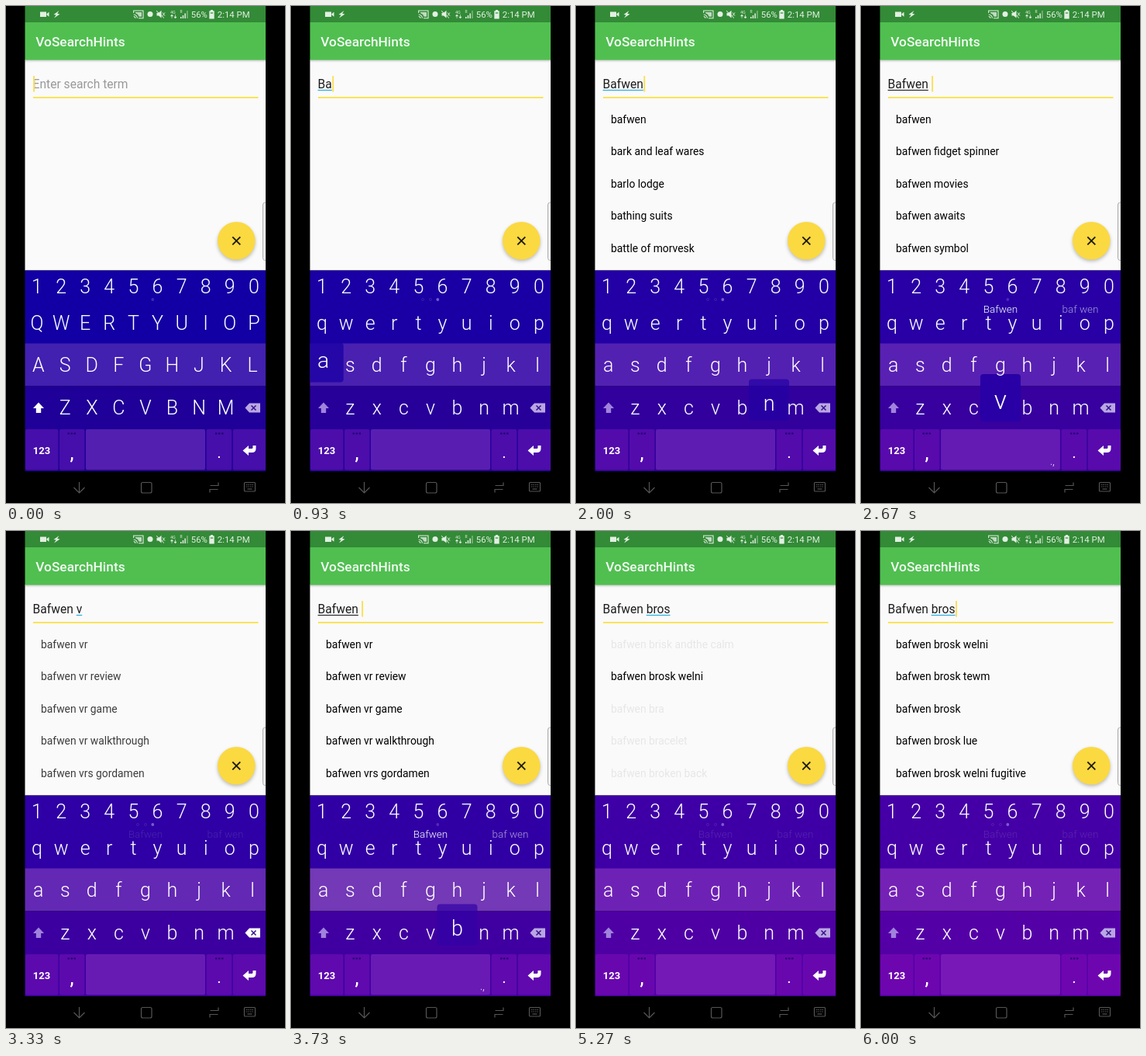
An HTML page for the animation above (6.07 s loop, 360 by 640 pixels).

```html
<!DOCTYPE html>
<html lang="en">
<head>
<meta charset="utf-8">
<title>Search suggestions</title>
<style>
html, body { margin: 0; width: 100%; height: 100%; overflow: hidden; background: #000; }
svg { display: block; width: 360px; height: 640px; font-family: Roboto, sans-serif; }
text { white-space: pre; }
.key { font-size: 25px; font-weight: 300; fill: #fff; text-anchor: middle; }
.item { font-size: 13.87px; fill: #000; }
.field { font-size: 15.6px; }
.status { font-size: 11.4px; fill: #e2efe2; }
.word { font-size: 13.5px; font-weight: 300; fill: #fff; text-anchor: middle; }
.nav { fill: none; stroke: #555; stroke-width: 1.2; }
</style>
</head>
<body>
<svg viewBox="0 0 360 640" xmlns="http://www.w3.org/2000/svg">
  <defs>
    <clipPath id="page"><rect x="24.5" y="69" width="310.5" height="271.5"/></clipPath>
    <clipPath id="board"><rect x="24.5" y="340.5" width="310.5" height="258.5"/></clipPath>
    <filter id="soft" x="-30%" y="-30%" width="160%" height="160%"><feGaussianBlur stdDeviation="2.4"/></filter>
    <linearGradient id="shade" x2="0" y2="1"><stop stop-opacity=".2"/><stop offset="1" stop-opacity="0"/></linearGradient>
  </defs>
  <rect width="360" height="640"/>
  <rect x="24.5" y="69" width="310.5" height="271.5" fill="#fafafa"/>
  <rect x="24.5" y="69" width="310.5" height="4" fill="url(#shade)"/>
  <rect x="24.5" y="21" width="310.5" height="48.5" fill="#50bf50"/>
  <rect x="24.5" width="310.5" height="21" fill="#338a37"/>
  <text x="38.3" y="52" font-size="17.3" font-weight="500" fill="#f4fbf4">VoSearchHints</text>

  <g fill="#e2efe2">
    <path d="M44 7.5h8v6.500h-8zM52.500 10l3-2.300v6l-3-2.300z"/>
    <path d="M68.500 6l-7 5 3.200.6-2.700 4 7.500-5.200-3.300-.6z"/>
    <path d="M164.700 9V6h12.300v9.700h-6M164.700 11a4.700 4.700 0 0 1 4.700 4.700M164.700 13.500a2.200 2.200 0 0 1 2.200 2.200" fill="none" stroke="#e2efe2" stroke-width="1.100"/>
    <path d="M167 8h8v5.800h-3.500a6.500 6.500 0 0 0-4.500-4.500z" opacity=".8"/>
    <circle cx="186" cy="10.500" r="3.500"/>
    <path d="M194.500 8.800h2.500l3.500-3v9.800l-3.500-3h-2.500z"/>
    <path d="M194 6l10 9.500M202 8.500l3 4M205 8.500l-3 4" stroke="#e2efe2" fill="none"/>
    <text x="212" y="9.500" font-size="5.500">4G</text>
    <path d="M212.500 13h3l-1.500-2zM214 13v3M217 14h3l-1.500 2zM218.500 11v3" stroke="#e2efe2" stroke-width=".6"/>
    <text x="224.500" y="9" font-size="5">R</text>
    <path d="M225 14h1.500v2H225zM227.700 12h1.500v4h-1.500zM230.400 9.500h1.500V16h-1.500z"/>
    <path d="M233.200 6h1.500v10h-1.500z" opacity=".45"/>
    <path d="M264 5h3v1.300h1.700V16.500h-6.400V6.300h1.700z"/>
    <path d="M263.800 9h3.400" stroke="#338a37" stroke-width="1.200"/>
  </g>
  <text class="status" x="238.800" y="14.700">56%</text>
  <text class="status" x="272.800" y="14.700">2:14 PM</text>

  <rect x="35" y="117" width="290.500" height="1.700" fill="#fbe03c"/>
  <text id="hint" class="field" x="34.600" y="106.300" fill="#999">Enter search term</text>
  <text id="typed" class="field" x="34.600" y="106.300" fill="#1c1c1c"></text>
  <rect id="under" y="107.800" height="1.300"/>
  <rect id="caret" y="90" width="1.900" height="20.500" fill="#f9df55"/>
  <g id="list" clip-path="url(#page)"></g>

  <path d="M335 253h-.5q-3 0-3 3v68.500q0 3 3 3h.5" fill="#f5f5f5" stroke="#aaa"/>
  <circle cx="297.300" cy="304.500" r="24" opacity=".28" filter="url(#soft)"/>
  <circle cx="297.300" cy="302.300" r="24.300" fill="#fbd941"/>
  <path d="M292.300 297.300l10 10M302.300 297.300l-10 10" stroke="#1d1a0a" stroke-width="1.900"/>

  <g clip-path="url(#board)">
    <rect id="base" x="24" y="340" width="312" height="95"/>
    <rect id="home" x="24" y="434.500" width="312" height="55"/>
    <rect id="low" x="24" y="489.500" width="312" height="110"/>
    <g id="foot">
      <rect x="25" y="545" width="42.500" height="52.500" rx="2"/>
      <rect x="69" y="545" width="32.500" height="52.500" rx="2"/>
      <rect x="103" y="545" width="154" height="52.500" rx="2"/>
      <rect x="258.500" y="545" width="32.800" height="52.500" rx="2"/>
      <rect x="292.800" y="545" width="42.700" height="52.500" rx="2"/>
    </g>
    <rect id="bar" x="103" y="545" width="154" height="52" rx="2" fill="#fff" opacity=".07"/>
    <g fill="#140060" opacity=".75">
      <path d="M79.500 549.500h2.500v2h-2.500zM83.500 549.500h2.500v2h-2.500zM87.500 549.500h2.500v2h-2.500z"/>
      <path d="M270 549.500h2.500v2h-2.500zM274 549.500h2.500v2h-2.500zM278 549.500h2.500v2h-2.500z"/>
    </g>
    <g id="dots" fill="none" stroke="#8a70dc" stroke-width=".8">
      <circle cx="170" cy="378" r="1.500"/><circle cx="180" cy="378" r="1.500"/>
    </g>
    <circle id="dot" cx="189.300" cy="378" r="1.900" fill="#8e7be0"/>
    <text id="wordA" class="word" x="180" y="394.500">Bafwen</text>
    <text id="wordB" class="word" x="283" y="394.500">baf wen</text>
    <text id="marks" x="244" y="591" font-size="12" fill="#d9c8f2">.,</text>
    <rect id="pop" rx="4"/>
    <g id="keys"></g>
    <path id="shift" d="M42 510.500l7 7.500h-3.800v6h-6.400v-6H35z"/>
    <path id="del" d="M308.500 517.500l5.500-6h14v12h-14z"/>
    <path d="M316.500 514.500l6 6M322.500 514.500l-6 6" stroke="#35108c" stroke-width="1.500"/>
    <text x="46" y="577" font-size="13" font-weight="700" fill="#fff" text-anchor="middle">123</text>
    <text x="85" y="584" font-size="23" font-weight="500" fill="#fff" text-anchor="middle">,</text>
    <text x="275" y="582" font-size="21" fill="#fff" text-anchor="middle">.</text>
    <path d="M305.500 572.500l7.500-6.500v4h4q1.500 0 1.500-1.500V566h4v4q0 5-5 5H313v4z" fill="#fff"/>
  </g>

  <g class="nav">
    <path d="M94.500 613v13.500M87.500 620l7 7 7-7"/>
    <rect x="174.500" y="613.500" width="13.500" height="13.500" rx="2"/>
    <path d="M263.500 617.500h10.500v-4M273.500 622.500h-10.500v4"/>
    <rect x="307.500" y="613.500" width="14" height="11.500" rx="1"/>
    <path d="M310 616.500h9M310 619h9" stroke-dasharray="1.500 1"/>
    <path d="M311.500 622h6"/>
  </g>
</svg>
<script>
const LOOP = 6070, LEFT = 34.6;
const $ = id => document.getElementById(id);
const set = (el, attrs) => { for (const k in attrs) el.setAttribute(k, attrs[k]); };
const clamp = v => Math.max(0, Math.min(1, v));
const ease = v => (1 - Math.cos(Math.PI * clamp(v))) / 2;

function addText(parent, cls) {
  const el = document.createElementNS("http://www.w3.org/2000/svg", "text");
  el.setAttribute("class", cls);
  return parent.appendChild(el);
}

// keyboard rows: characters, first x, step, centre y
const keys = {};
[["1234567890", 40, 31.1, 361], ["qwertyuiop", 40, 31.1, 408],
 ["asdfghjkl", 41.7, 34.55, 462.5], ["zxcvbnm", 76.3, 34.55, 517]]
.forEach(([chars, x0, dx, y]) => [...chars].forEach((c, i) => {
  keys[c] = { x: x0 + i * dx, y, el: addText($("keys"), "key") };
}));

// press time, key, moment the text changes, text afterwards
const presses = [
  [410, "b", 480, "B"], [820, "a", 890, "Ba"], [1150, "f", 1220, "Baf"],
  [1420, "w", 1490, "Bafw"], [1650, "e", 1720, "Bafwe"], [1880, "n", 1940, "Bafwen"],
  [2290, " ", 2350, "Bafwen "], [2600, "v", 2700, "Bafwen v"], [3330, "<", 3400, "Bafwen "],
  [3610, "b", 3745, "Bafwen b"], [4050, "r", 4120, "Bafwen br"],
  [4350, "o", 4420, "Bafwen bro"], [4640, "s", 4710, "Bafwen bros"]
];

const named = tails => tails.split("|").map(s => ("bafwen " + s).trim());
const lists = [
  [0, []],
  [1600, ["bafwen", "bark and leaf wares", "barlo lodge", "bathing suits", "battle of morvesk"]],
  [2340, named("|fidget spinner|movies|awaits|symbol")],
  [3120, named("vr|vr review|vr game|vr walkthrough|vrs gordamen")],
  [4480, named("brisk andthe calm|brosk welni|bra|bracelet|broken back")],
  [5160, named("brosk welni|brosk tewm|brosk|brosk lue|brosk welni fugitive")]
];
const slots = Array.from({ length: 10 }, () => addText($("list"), "item"));

const pen = document.createElement("canvas").getContext("2d");
function width(s) {
  pen.font = "15.6px Roboto, sans-serif";
  return pen.measureText(s).width;
}

function drawField(t) {
  const last = presses.filter(p => p[2] <= t).pop();
  const text = last ? last[3] : "";
  const since = last ? t - last[2] : t;
  $("typed").textContent = text;
  set($("hint"), { opacity: text ? 0 : 1 });
  const end = LEFT + width(text);
  set($("caret"), { x: end + 0.5, opacity: since % 1000 < 500 ? 1 : 0 });
  const done = text.endsWith(" ");
  const start = done ? LEFT : LEFT + width(text.slice(0, text.lastIndexOf(" ") + 1));
  const stop = done ? LEFT + width(text.trim()) : end;
  set($("under"), { x: start, width: stop - start, fill: done ? "#333" : "#32b1df" });
  return text;
}

// rows leave first, then the kept ones slide, then new ones appear
function drawList(t) {
  let n = lists.length - 1;
  while (lists[n][0] > t) n--;
  const now = lists[n][1], old = n ? lists[n - 1][1] : [], u = t - lists[n][0];
  const wait = old.length ? 120 : 0;
  const slides = now.some((s, i) => old.includes(s) && old.indexOf(s) !== i);
  const rows = [];
  old.forEach((s, i) => { if (!now.includes(s)) rows.push([s, i, 1 - clamp(u / 120)]); });
  now.forEach((s, i) => {
    const from = old.indexOf(s);
    if (from < 0) rows.push([s, i, clamp((u - wait - (slides ? 250 : 0)) / 120)]);
    else rows.push([s, from + (i - from) * ease((u - wait) / 250), 1]);
  });
  slots.forEach((el, i) => {
    const [s, pos, alpha] = rows[i] || ["", 0, 0];
    el.textContent = s;
    set(el, { x: 45, y: 150.7 + 41.5 * pos, opacity: alpha });
  });
}

const mix = (a, b, k) => `rgb(${a.map((v, i) => Math.round(v + (b[i] - v) * k))})`;

function drawKeys(t, text) {
  const k = t / 6000;
  const glow = Math.exp(-(((t - 3730) / 350) ** 2));
  const base = mix([18, 0, 164], [68, 0, 166], k);
  set($("base"), { fill: base });
  set($("home"), { fill: mix([66 + 18 * glow, 32 + 24 * glow, 176 + 6 * glow], [116 + 18 * glow, 34 + 24 * glow, 182], k) });
  set($("low"), { fill: mix([31, 0, 152], [84, 0, 167], k) });
  set($("foot"), { fill: mix([70, 14, 170], [110, 6, 176], k) });

  const hit = presses.find(p => t >= p[0] && t < p[0] + 190);
  const u = hit ? t - hit[0] : 0;
  const rise = u < 90 ? clamp(u / 60) : clamp((190 - u) / 100);
  const down = hit && keys[hit[1]];
  const upper = !text;
  for (const c in keys) {
    const { x, y, el } = keys[c];
    const lift = keys[c] === down ? rise : 0;
    el.textContent = upper ? c.toUpperCase() : c;
    set(el, { transform: `translate(${x} ${y + 8.8 - 7 * lift}) scale(${1 + 0.35 * lift ** 4})` });
  }
  set($("pop"), { opacity: down ? rise : 0 });
  if (down) {
    const inHome = down.y === 462.5;
    const top = down.y - (inHome ? 29 : 22 + 21 * rise);
    const bottom = down.y + (inHome ? 22 : 14 + 4 * rise);
    set($("pop"), { x: down.x - 26, y: top, width: 52, height: bottom - top, fill: base });
  }
  set($("shift"), { fill: upper ? "#fff" : "#a083dc" });
  set($("del"), { fill: hit && hit[1] === "<" ? "#fff" : "#b9a6e2" });
  set($("bar"), { opacity: hit && hit[1] === " " ? 0.07 + 0.12 * rise : 0.07 });

  const ready = text.endsWith(" "), seen = text.includes(" ");
  set($("wordA"), { opacity: ready ? 1 : seen ? 0.13 : 0 });
  set($("wordB"), { opacity: ready ? 0.6 : seen ? 0.13 : 0 });
  set($("marks"), { opacity: ready ? 1 : 0 });
  set($("dots"), { opacity: upper || ready ? 0 : 0.3 });
  set($("dot"), { opacity: upper || ready ? 0.35 : 0.75 });
}

function draw(t) {
  const text = drawField(t);
  drawList(t);
  drawKeys(t, text);
}

const begin = performance.now();
function tick() {
  draw((performance.now() - begin) % LOOP);
  requestAnimationFrame(tick);
}
tick();
</script>
</body>
</html>
```
